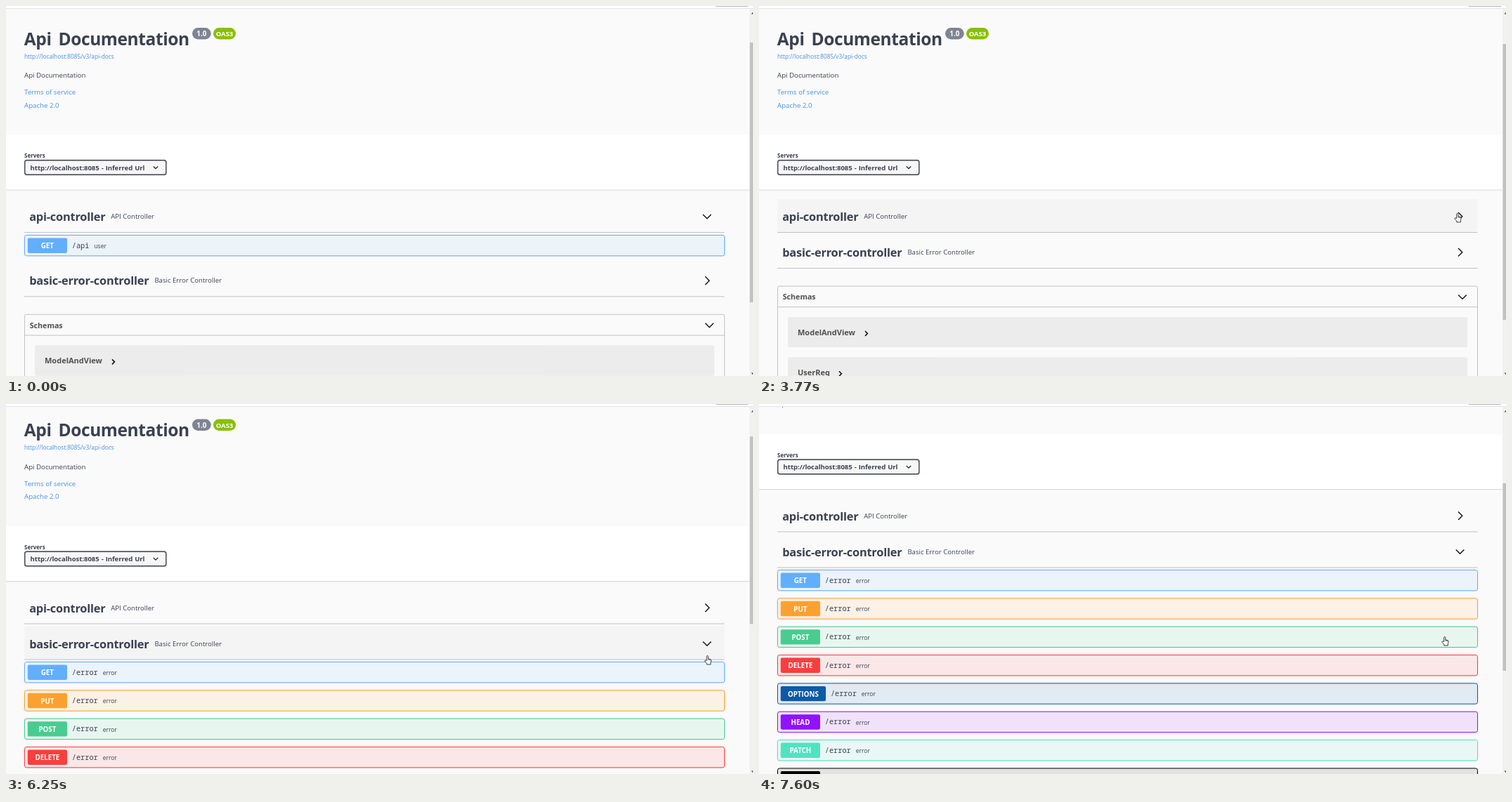
Write an HTML page that moves like this. It is 1063 by 527 pixels and loops after 8000 ms.

```html
<!DOCTYPE html>
<html lang="en">
<head>
<meta charset="utf-8">
<title>Api Documentation</title>
<style>
  html, body { margin: 0; width: 100%; height: 100%; overflow: hidden; background: #fafafa; }
  svg { display: block; width: 100vw; height: 100vh; }
  text { font-family: "Open Sans", "Noto Sans", sans-serif; fill: #3b4151; white-space: pre; }
  .b { font-weight: 700; }
  .link { fill: #4990e2; }
  .mono { font-family: "Noto Sans Mono", "DejaVu Sans Mono", monospace; }
  .mid { text-anchor: middle; }
  .white { fill: #fff; }
  .grey { fill: #505050; }
</style>
</head>
<body>
<svg id="stage" viewBox="0 0 1063 527" preserveAspectRatio="none"></svg>
<script>
const LOOP = 8000, STEP = 40.35, LINE = "#c0c2c6";
const stage = document.getElementById("stage");

function el(parent, tag, attrs = {}, content) {
  const node = document.createElementNS("http://www.w3.org/2000/svg", tag);
  for (const k in attrs) node.setAttribute(k, attrs[k]);
  if (content !== undefined) node.textContent = content;
  parent.appendChild(node);
  return node;
}
const group = (p, attrs) => el(p, "g", attrs);
const rect = (p, x, y, width, height, fill, more) => el(p, "rect", { x, y, width, height, fill, ...more });
const text = (p, x, y, size, cls, str, more) =>
  el(p, "text", { x, y, "font-size": size, class: cls, ...more }, str);
const stroke = (p, d, color, width) =>
  el(p, "path", { d, fill: "none", stroke: color, "stroke-width": width });
const show = (node, on) => node.setAttribute("visibility", on ? "inherit" : "hidden");
const shift = (node, x, y) => node.setAttribute("transform", `translate(${x} ${y})`);

const defs = el(stage, "defs");
rect(el(defs, "clipPath", { id: "view" }), 0, 4, 1058, 523);
const shadow = el(defs, "filter", { id: "soft", x: "-5%", y: "-30%", width: "110%", height: "160%" });
el(shadow, "feDropShadow", { dx: 0, dy: 0, stdDeviation: 0.9, "flood-opacity": 0.17 });

rect(stage, 0, 0, 1063, 527, "#fafafa");
const page = group(group(stage, { "clip-path": "url(#view)" }));

function info() {
  text(page, 25.8, 55.5, 24.5, "b", "Api Documentation", { "letter-spacing": -0.4, "word-spacing": 4 });
  rect(page, 265, 31, 26.7, 16.5, "#7d8492", { rx: 8.2 });
  text(page, 278.3, 43, 9.8, "b mid white", "1.0");
  rect(page, 295, 31, 32, 16.5, "#89bf04", { rx: 8.2 });
  text(page, 311, 43, 9.5, "b mid white", "OAS3");
  text(page, 26, 74.6, 8.3, "link", "http://localhost:8085/v3/api-docs");
  text(page, 26, 102, 9.7, "", "Api Documentation");
  text(page, 26, 126.4, 9.7, "link", "Terms of service");
  text(page, 26, 144.9, 9.7, "link", "Apache 2.0");
}

function servers() {
  rect(page, 0, 183.5, 1058, 78, "#fff");
  rect(page, 0, 261.5, 1058, 1, "#dcdcdc");
  rect(page, 0, 262.5, 1058, 1, "#f2f2f2");
  text(page, 26, 216, 8, "b", "Servers");
  rect(page, 26.8, 219.8, 201, 20.4, "#f7f7f7",
    { rx: 2.8, stroke: "#41444e", "stroke-width": 1.4, filter: "url(#soft)" });
  text(page, 34.6, 233.6, 9.6, "b", "http://localhost:8085 - Inferred Url",
    { "letter-spacing": -0.08, "word-spacing": 0.6 });
  stroke(page, "M209.8 228.5l3.2 3.2 3.2-3.2", "#222", 1.3);
}

// Section heading drawn for a row whose top is at y = 0
function section(title, note, noteX) {
  const g = group(page);
  const glow = rect(g, 26, 0, 996.5, 47, "#000");
  rect(g, 26, 47, 996.5, 1, LINE);
  text(g, 33.2, 31, 16.4, "b", title, { "letter-spacing": -0.22 });
  text(g, noteX, 28, 9.6, "", note);
  const down = stroke(g, "M991.8 22l5.8 5.8 5.8-5.8", "#111", 1.4);
  const right = stroke(g, "M995 19l5.8 5.8-5.8 5.8", "#111", 1.4);
  return { g, glow, down, right };
}

function operation(parent, y, method, color, path, note) {
  const g = group(parent, { transform: `translate(0 ${y})` });
  const wide = method === "OPTIONS" ? 64.3 : 56.2;
  rect(g, 26.5, 0, 996, 29.3, "#fafafa", { rx: 2.8, filter: "url(#soft)" });
  rect(g, 26.5, 0, 996, 29.3, color, { rx: 2.8, "fill-opacity": 0.1, stroke: color });
  rect(g, 30.8, 4, wide, 21.4, color, { rx: 2.1 });
  text(g, 30.8 + wide / 2, 18.8, 9.8, "b mid white", method);
  const x = 37.6 + wide;
  text(g, x, 18, 10.25, "mono", path);
  text(g, x + path.length * 6.15 + 7, 18.6, 8.5, "", note);
}

function schemas() {
  const g = group(page);
  rect(g, 26.5, 0.5, 996, 260, "none", { rx: 2.8, stroke: LINE });
  rect(g, 26.5, 29.7, 996, 1, LINE);
  text(g, 33.7, 19.8, 10.7, "b grey", "Schemas");
  stroke(g, "M995.2 13l5.8 5.8 5.8-5.8", "#111", 1.4);
  [["ModelAndView", 151], ["UserReq", 114]].forEach(([name, x], i) => {
    const y = 44.5 + i * 57.2;
    rect(g, 41, y, 967, 43.3, "#ececec", { rx: 2.8 });
    text(g, 55, y + 26, 11, "b grey", name);
    stroke(g, `M${x} ${y + 20}l3.4 3.5-3.4 3.5`, "#111", 1.6);
  });
  return g;
}

info();
servers();
const api = section("api-controller", "API Controller", 149.2);
const basic = section("basic-error-controller", "Basic Error Controller", 211.4);
const apiOps = group(page);
operation(apiOps, 326.5, "GET", "#61affe", "/api", "user");
const basicOps = group(page);
Object.entries({
  GET: "#61affe", PUT: "#fca130", POST: "#49cc90", DELETE: "#f93e3e",
  OPTIONS: "#0d5aa7", HEAD: "#9012fe", PATCH: "#50e3c2", TRACE: "#000"
}).forEach(([method, color], i) => operation(basicOps, 377 + i * STEP, method, color, "/error", "error"));
const models = schemas();

// Browser edge and scrollbar
rect(stage, 0, 0, 1063, 3, "#fff");
rect(stage, 0, 3, 1063, 1, "#e4e4e4");
rect(stage, 1010, 0, 46, 1, "#bdb8b8");
rect(stage, 1058, 4, 5, 523, "#f1f1f1");
const thumb = rect(stage, 1058.5, 52, 4.5, 370, "#c1c1c1");
el(stage, "path", { d: "M1060.3 11.5L1063 8.8V11.5ZM1060.3 522.5L1063 525.2V522.5Z", fill: "#505050" });

const ink = { fill: "#fff", stroke: "#222", "stroke-width": 0.9, "stroke-linejoin": "round" };
const arrow = el(stage, "path", { d: "M0 0V9L2.1 7.2L3.6 10.6L5 10L3.6 6.7L6.3 6.5Z", ...ink });
const hand = group(stage);
el(hand, "path", {
  d: "M-1.1 7V.9C-1.1-.4 1.1-.4 1.1.9V4.3L4.2 5Q5.4 5.3 5.3 6.8L4.6 10V12.4H-1V10.8L-3.6 7.9C-4.3 6.6-2.8 5.6-1.9 6.6Z", ...ink
});
stroke(hand, "M1.1 4.3V6.5M2.7 4.8V6.6M4 5.2V6.8", "#222", 0.6);

// Bursts of change: start, end, number of steps
const BURSTS = [
  [390, 1080, 11], [1280, 1360, 2], [1620, 1910, 5], [2170, 2830, 10], [3240, 3310, 2], [3770, 4520, 12],
  [4590, 4990, 5], [6250, 6530, 5], [6860, 6930, 2], [7130, 7200, 2], [7400, 7600, 4]
];
// Pointer path: time, x, y
const POINTER = [
  [0, 600, 545], [390, 575, 515], [1080, 418, 215], [1280, 414, 208], [1360, 410, 215], [1620, 445, 247],
  [1910, 1030, 352], [2170, 1026, 344], [2540, 993.8, 295.5], [3770, 993.8, 295.5], [3980, 997, 308],
  [4290, 1014, 368], [4370, 1015.5, 395], [4520, 1010, 385], [4590, 1004, 372], [4790, 998.2, 358.6],
  [6930, 998.2, 358.6], [7130, 972, 351], [7200, 964.5, 348], [7400, 966, 346], [7600, 975.8, 331.6]
];
const SCROLL = [[6180, 0], [6250, 9.5], [6320, 62], [6390, 107.5], [6460, 132], [6530, 140.5]];

function track(keys, t) {
  if (t <= keys[0][0]) return keys[0].slice(1);
  for (let i = 1; i < keys.length; i++) {
    const [a, b] = [keys[i - 1], keys[i]];
    if (t <= b[0]) {
      const k = (t - a[0]) / (b[0] - a[0]);
      return a.slice(1).map((v, j) => v + (b[j + 1] - v) * k);
    }
  }
  return keys[keys.length - 1].slice(1);
}

function held(t) {
  let q = 0;
  for (const [a, b, n] of BURSTS) {
    if (t < a) break;
    const d = (b - a) / (n - 1);
    q = t >= b ? b : a + Math.floor((t - a) / d + 0.02) * d;
  }
  return q;
}

function stateAt(t) {
  const apiOpen = t < 2620 || (t >= 3240 && t < 3770);
  const basicOpen = t >= 4880;
  const [x, y] = track(POINTER, t);
  const [scroll] = track(SCROLL, t);
  const basicTop = 326 + (apiOpen ? STEP : 0);
  // Hover is only re-evaluated once scrolling has settled
  const py = y + (t < 6830 ? 0 : scroll);
  const within = (top, h) => x > 26 && x < 1022 && py > top && py < top + h;
  const onApi = within(275, 47), onBasic = within(basicTop, 47);
  const modelsTop = basicTop + 72.5 + (basicOpen ? 8 * STEP : 0);
  const onOps = (apiOpen && within(326, 30)) || (basicOpen && within(377, 8 * STEP));
  return { apiOpen, basicOpen, x, y, scroll, basicTop, modelsTop, onApi, onBasic,
    link: onApi || onBasic || onOps || within(modelsTop, 30) };
}

function fade(t, key) {
  let sum = 0;
  for (let i = 0; i < 4; i++) sum += stateAt(t - i * 40)[key] ? 1 : 0;
  return sum / 4 * 0.025;
}

function place(row, top, open, glow) {
  shift(row.g, 0, top);
  row.glow.setAttribute("fill-opacity", glow);
  show(row.down, open);
  show(row.right, !open);
}

function draw(time) {
  const t = held(time % LOOP);
  const s = stateAt(t);
  shift(page, 0, -s.scroll);
  place(api, 275, s.apiOpen, fade(t, "onApi"));
  place(basic, s.basicTop, s.basicOpen, fade(t, "onBasic"));
  show(apiOps, s.apiOpen);
  show(basicOps, s.basicOpen);
  shift(models, 0, s.modelsTop);
  const [top, size] = s.basicOpen ? [41.5 + s.scroll * 0.508, 267] : s.apiOpen ? [52, 370] : [54, 393];
  thumb.setAttribute("y", top);
  thumb.setAttribute("height", size);
  shift(arrow, s.x, s.y);
  shift(hand, s.x, s.y);
  show(arrow, !s.link);
  show(hand, s.link);
}

const begin = performance.now();
function frame() {
  draw(performance.now() - begin);
  requestAnimationFrame(frame);
}
frame();
</script>
</body>
</html>
```
